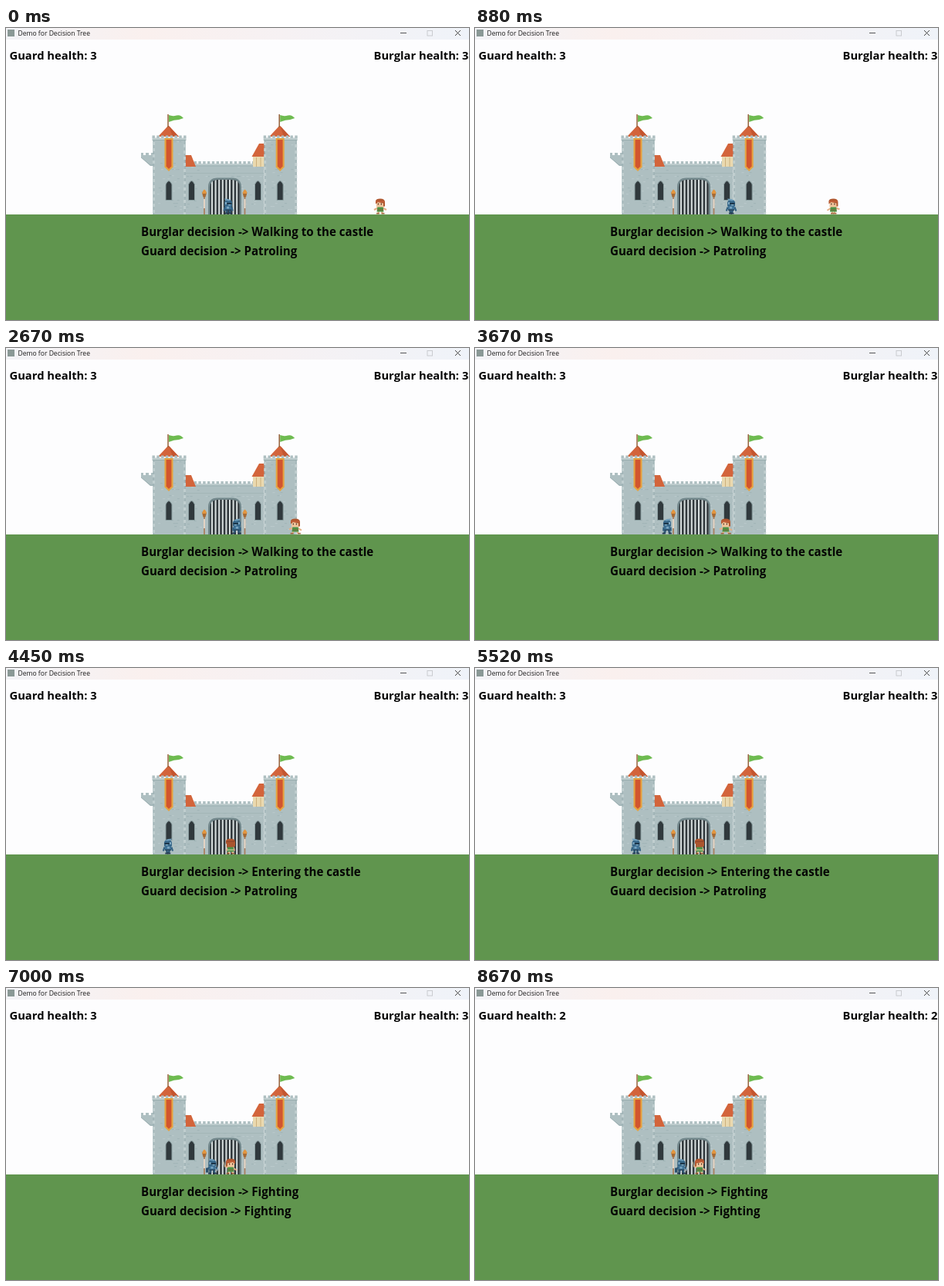
These frames come from a looping animation (600x379 px, 10 s). An HTML page:

```html
<!DOCTYPE html>
<html lang="en">
<head>
<meta charset="utf-8">
<title>Demo for Decision Tree</title>
<style>
html, body { margin: 0; width: 100%; height: 100%; overflow: hidden; background: #fdfdfe; }
svg { display: block; width: 100vw; height: 100vh; }
text { font-family: "Open Sans", "Noto Sans", sans-serif; white-space: pre; }
.hud { font-weight: 700; font-size: 15.1px; fill: #050505; }
.health { font-size: 14.75px; }
</style>
</head>
<body>
<svg id="stage" viewBox="0 0 600 379" preserveAspectRatio="none">
  <defs>
    <linearGradient id="bar">
      <stop offset="0" stop-color="#f2f3f7"/><stop offset=".3" stop-color="#faf0ee"/>
      <stop offset=".6" stop-color="#f6f1f3"/><stop offset="1" stop-color="#eff3f9"/>
    </linearGradient>
    <clipPath id="arch"><path d="M264.5 242V207Q264.5 197 274 197H293Q303 197 303 207V242Z"/></clipPath>
  </defs>
  <rect width="600" height="379" fill="#fdfdfe"/>
  <rect width="600" height="15" fill="url(#bar)"/>
  <rect x="2" y="2" width="9" height="9" fill="#8a9996"/>
  <text x="15.5" y="9.6" font-size="8.55" fill="#1b1b1b">Demo for Decision Tree</text>
  <path d="M511 6.5H519" stroke="#444" stroke-width=".9"/>
  <rect x="546" y="3.5" width="6.5" height="6.5" fill="none" stroke="#c9cbcf"/>
  <path d="M582 3L589 10M589 3L582 10" stroke="#333" stroke-width=".9"/>
  <g id="castle"></g>
  <rect y="242" width="600" height="137" fill="#60954e"/>
  <g id="guard"></g>
  <g id="burglar"></g>
  <g class="hud">
    <text id="guardHealth" class="health" x="4.5" y="41"></text>
    <text id="burglarHealth" class="health" x="476.5" y="41"></text>
    <text id="burglarText" x="175" y="269.5"></text>
    <text id="guardText" x="175" y="294.5"></text>
  </g>
</svg>
<script>
const LOOP = 10000;
const $ = id => document.getElementById(id);
const rect = (x, y, w, h, fill) =>
  `<rect x="${x}" y="${y}" width="${w}" height="${h}" fill="${fill}"/>`;
const path = (d, fill, extra = "") => `<path d="${d}" fill="${fill}" ${extra}/>`;
const line = (d, color, width) => path(d, "none", `stroke="${color}" stroke-width="${width}"`);

const STONE = "#aebfc1", EDGE = "#93a9ab", LIGHT = "#c0cecf", ROOF = "#d3643b";

let seed = 7;
const random = () => (seed = seed * 16807 % 2147483647) / 2147483647;

function bricks(x, y, w, h) {
  let out = "";
  for (let i = 0; i < w * h / 90; i++) {
    const bx = x + random() * (w - 4), by = y + Math.floor(random() * (h - 3) / 4) * 4;
    out += rect(bx.toFixed(1), by, 3, 1.2, i % 2 ? "#a2b5b7" : "#b9c8ca");
  }
  return out;
}

function battlement(x, y, w) {
  let out = rect(x, y + 3, w, 2.5, LIGHT);
  for (let i = x; i < x + w - 2; i += 5.8) out += rect(i, y, 3.4, 3.5, STONE);
  return out + rect(x, y + 5.5, w, .8, EDGE);
}

const slit = (x, y) =>
  path(`M${x} ${y + 25.5}V${y + 5}Q${x + 4} ${y - 4} ${x + 8} ${y + 5}V${y + 25.5}Z`, "#30393d",
    'stroke="#8da1a3" stroke-width="1"');

const pennant = (c, half, top, tip, fill) =>
  path(`M${c - half} ${top}H${c + half}V${tip - half}L${c} ${tip}L${c - half} ${tip - half}Z`, fill);

function tower(x) {
  const c = x + 20.5;
  let quoins = "";
  for (let y = 148; y < 240; y += 8) {
    quoins += rect(x - .5, y, 3, 4, LIGHT) + rect(x + 39.5, y + 3, 3, 4, LIGHT);
  }
  return rect(x, 143, 42, 99, STONE) + bricks(x + 3, 147, 36, 94) +
    line(`M${x + .5} 143V242M${x + 41.5} 143V242`, EDGE, .8) + quoins +
    path(`M${c - 14} 141L${c - 1} 127H${c}L${c + 13} 141Z`, ROOF) +
    path(`M${c} 127L${c + 13} 141H${c + 5}Z`, "#c4552f") +
    battlement(x - 1, 139.5, 44) +
    line(`M${c - 1} 112V129`, "#96623b", 1.5) +
    path(`M${c} 113Q${c + 5} 115 ${c + 10} 113.5T${c + 19} 117L${c + 13} 119Q${c + 7} 119 ${c} 122Z`, "#6ebb50") +
    pennant(c, 5.5, 143, 186, "#e6a33f") + pennant(c, 3.4, 145, 183, "#d1552f") +
    slit(c - 4, 198);
}

function torch(x) {
  return line(`M${x} 219V242`, "#a97c5a", 1.7) + rect(x - .9, 222, 1.8, 12, "#e9dccf") +
    path(`M${x - 3} 213.5h6l-1.5 6h-3z`, "#a66a35") +
    path(`M${x - 2.5} 215Q${x - 3} 212 ${x} 209.5Q${x + 3.5} 212 ${x + 2.5} 215Z`, "#e3963f");
}

function castle() {
  let bars = "";
  for (let x = 266; x < 303; x += 4.6) bars += rect(x, 197, 2, 45, "#d9e0e0");
  return path("M175 162h3v3h3v-3h4v3h3v-3h4v17h-5L175 168Z", STONE) +
    line("M175 168L187 178H191", EDGE, .8) +
    rect(232, 178, 102, 64, STONE) + bricks(233, 180, 100, 60) + battlement(232, 173, 102) +
    rect(232, 188, 102, .8, "#a1b4b6") +
    path("M232 165H240L246 180H232Z", ROOF) +
    rect(320, 166, 15, 14, "#ead9af") + line("M324.5 168V180M330 168V180", "#cdb07d", 1) +
    path("M318.5 167L328 150H335V167Z", ROOF) +
    path("M262 242V207Q262 194.5 274 194.5H293Q305 194.5 305 207V242Z", "#71868a") +
    `<g clip-path="url(#arch)">${rect(262, 194, 44, 48, "#32393d")}${bars}</g>` +
    slit(236.5, 198) + slit(322.5, 198) + tower(190.5) + tower(334.7) + torch(257) + torch(309.5);
}

// Figures are drawn around x = 0 with their feet at y = 0.
function guardFigure(step, fighting) {
  const s = step * 1.5;
  return line(`M-2 -6L${-2 - s} -1M2 -6L${2 + s} -1`, "#325a78", 2.8) +
    rect(-4.5 - s, -1.8, 4, 1.8, "#22384c") + rect(.8 + s, -1.8, 4, 1.8, "#22384c") +
    rect(-4, -11, 8, 6, "#41759a") + rect(-2, -10, 3, 3, "#7ba6c2") + rect(-4, -6, 8, 1.2, "#22394e") +
    path("M-5 -10V-15Q-4.5 -18.5 0 -18.5T5 -15V-10Z", "#376789") +
    path("M-4 -18L-5 -20L0 -19.5L4 -18L1 -17Z", "#6f9ebc") +
    rect(-2, -14.5, 6.5, 1.6, "#172b3d") + rect(-4, -15.5, 2, 3, "#82abc4") + rect(0, -12.5, 3, 1.4, "#82abc4") +
    line(fighting ? "M-4 -9L-7 -5M4 -9L7 -6" : `M-4.5 -9L${-5.5 + s / 2} -4M4.5 -9L${5.5 - s / 2} -4`, "#315f80", 2.2) +
    (fighting ? line("M6 -4L8 -12", "#a7c1cf", 1.2) + rect(-8.5, -8, 3, 6, "#2c506d") : "");
}

function burglarFigure(step, pose) {
  const s = step * 1.5, back = pose === "back";
  const arms = back ? "M-4 -8L-5 -4M4 -8L5 -4"
    : pose === "fight" ? "M-3 -8L-8 -5M3 -8L8 -11" : `M-3 -8L-8 ${-5.5 - s / 2}M3 -8L8 ${-5.5 + s / 2}`;
  return line(`M-2 -4L${-2.5 - s} -1M2 -4L${2.5 + s} -1`, "#e8b98c", 2.2) +
    rect(-5 - s, -1.6, 4, 1.6, "#9a6238") + rect(1.5 + s, -1.6, 4, 1.6, "#9a6238") +
    line(arms, "#e5b086", 2) +
    path("M-3.5 -10H3.5L4.5 -3H-4.5Z", "#4c9348") + rect(-4, -6, 8, 1.1, back ? "#d8d5ac" : "#7b6a39") +
    rect(-5, -17, 10, 8, back ? "#a9552f" : "#f1c59c") +
    path("M-6 -13V-17Q-5.5 -20 0 -20T6 -16V-10H4V-14L-3 -15.5Z", "#b0572f") +
    rect(-5.5, -17, 11, 1.3, back ? "#8f452b" : "#c9603c") +
    (back ? "" : rect(-3.2, -14, 1.2, 2, "#54362a") + rect(.8, -14, 1.2, 2, "#54362a")) +
    (pose === "fight" ? line("M7 -9L9 -16", "#b4a58a", 1.2) : "");
}

function guardX(t) {
  if (t < 1445) return 288 + .05 * t;
  if (t < 5000) return 360.25 - .05 * (t - 1445);
  return 182.5 + .05 * (Math.min(t, 6700) - 5000);
}

const burglarX = t => Math.max(291, Math.min(485, 508.5 - .05 * t));

function place(id, x, flip, art) {
  $(id).setAttribute("transform", `translate(${x.toFixed(2)} 241.5) scale(${flip ? -1 : 1} 1)`);
  $(id).innerHTML = art;
}

function render(t) {
  const guardFights = t >= 6700, burglarFights = t >= 6170, entering = t >= 4350;
  const stride = Math.sin(t / 80);
  const pose = burglarFights ? "fight" : entering ? "back" : "walk";
  place("guard", guardX(t), t >= 1445 && t < 5000, guardFigure(guardFights ? .5 : stride, guardFights));
  place("burglar", burglarX(t), burglarFights, burglarFigure(entering ? 0 : stride, pose));
  const health = t >= 8670 ? 2 : 3;
  $("guardHealth").textContent = `Guard health: ${health}`;
  $("burglarHealth").textContent = `Burglar health: ${health}`;
  $("burglarText").textContent = "Burglar decision -> " +
    (burglarFights ? "Fighting" : entering ? "Entering the castle" : "Walking to the castle");
  $("guardText").textContent = "Guard decision -> " + (guardFights ? "Fighting" : "Patroling");
}

$("castle").innerHTML = castle();
const start = performance.now();
function tick() {
  render((performance.now() - start) % LOOP);
  requestAnimationFrame(tick);
}
tick();
</script>
</body>
</html>
```
